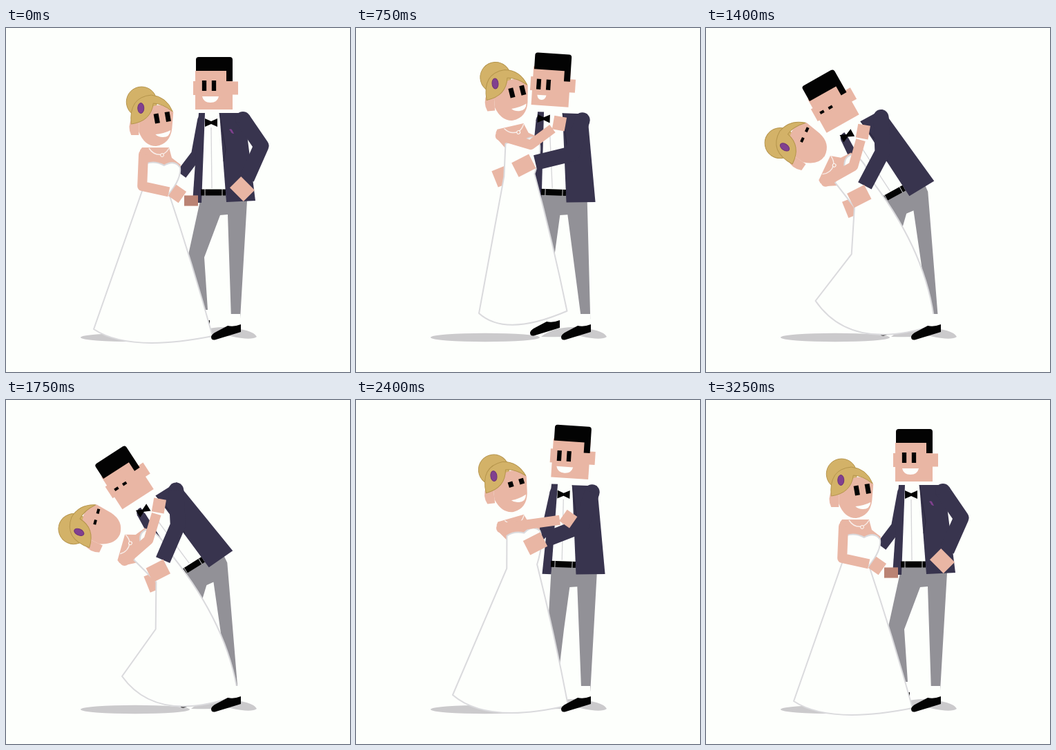
An HTML page with a canvas for the animation above (3.3 s loop, 498 by 498 pixels).

```html
<!DOCTYPE html>
<html lang="en">
<head>
<meta charset="utf-8">
<title>Wedding dance</title>
<style>
html, body { margin: 0; width: 100%; height: 100%; overflow: hidden; background: #fdfffc; }
canvas { display: block; }
</style>
</head>
<body>
<canvas id="stage" width="498" height="498"></canvas>
<script>
const c = document.getElementById('stage').getContext('2d');
const LOOP = 3300, STEP = 50;
const WHITE = '#fdfffc', BLACK = '#030303', SKIN = '#e9b6a4', NAVY = '#38344e',
  GREY = '#929197', SHADOW = '#cbcacc', HAIR = '#d3b268', HAIRLINE = '#b5954c',
  PURPLE = '#81408f', TRIM = '#dadadd';

// His hip and lean, her neck and bend, and the trailing hem corner; the rest follows by rule
const rest = { hip: 301, lean: 0, neckX: 226, neckY: 183, bend: 0, hemX: 127, hemY: 436 };
const hold = { hip: 301, lean: 2, neckX: 236, neckY: 178, bend: -16, hemX: 140, hemY: 427 };
const hop = { hip: 287, lean: 2, neckX: 235, neckY: 150, bend: -13, hemX: 178, hemY: 413 };
const kiss = { hip: 274, lean: -21.5, neckX: 197, neckY: 182, bend: -47, hemX: 149, hemY: 390 };
const dip = { hip: 271, lean: -32, neckX: 179, neckY: 207, bend: -74, hemX: 168, hemY: 400 };
const rise = { hip: 268, lean: -20, neckX: 187, neckY: 194, bend: -59, hemX: 155, hemY: 427 };
const timeline = [[0, rest], [500, hold], [750, hop], [1150, kiss], [1650, dip], [1750, dip],
  [2050, rise], [2400, hold], [2980, rest], [LOOP, rest]];

// Monotone cubic through the key poses
function tween(key, t) {
  const time = i => timeline[i][0], val = i => timeline[i][1][key];
  const slope = i => (val(i + 1) - val(i)) / (time(i + 1) - time(i));
  const tangent = i => {
    if (i < 1 || i > timeline.length - 2) return 0;
    const a = slope(i - 1), b = slope(i);
    return a * b > 0 ? 2 * a * b / (a + b) : 0;
  };
  let i = 0;
  while (i < timeline.length - 2 && t >= time(i + 1)) i++;
  const h = time(i + 1) - time(i), u = (t - time(i)) / h, v = 1 - u;
  return v * v * (1 + 2 * u) * val(i) + u * u * (1 + 2 * v) * val(i + 1) +
    h * u * v * (v * tangent(i) - u * tangent(i + 1));
}

function ramp(t, from, to) {
  const u = Math.min(1, Math.max(0, (t - from) / (to - from)));
  return u * u * (3 - 2 * u);
}

const pulse = (t, a, b, d, e) => ramp(t, a, b) - ramp(t, d, e);
const mix = (p, q, k) => p.map((v, i) => v + (q[i] - v) * k);
const add = ([x, y], dx, dy) => [x + dx, y + dy];

function turn(origin, deg, x, y) {
  const a = deg * Math.PI / 180, co = Math.cos(a), si = Math.sin(a);
  return add(origin, x * co - y * si, x * si + y * co);
}

// Elbow of a two-bone arm; side picks the way it bends
function elbow([x, y], [hx, hy], upper, lower, side) {
  const dx = hx - x, dy = hy - y, d = Math.hypot(dx, dy);
  const along = (upper * upper - lower * lower + d * d) / (2 * d);
  const out = side * Math.sqrt(Math.max(0, upper * upper - along * along));
  return [x + (dx * along - dy * out) / d, y + (dy * along + dx * out) / d];
}

function at([x, y], deg, draw) {
  c.save();
  c.translate(x, y);
  c.rotate(deg * Math.PI / 180);
  draw();
  c.restore();
}

function poly(color, ...p) {
  c.beginPath();
  for (let i = 0; i < p.length; i += 2) c.lineTo(p[i], p[i + 1]);
  c.fillStyle = color;
  c.fill();
}

function shape(d, fill, line, width = 1) {
  const path = new Path2D(d);
  c.fillStyle = fill;
  if (fill) c.fill(path);
  c.strokeStyle = line;
  c.lineWidth = width;
  if (line) c.stroke(path);
}

function oval(x, y, rx, ry, fill, line) {
  c.beginPath();
  c.ellipse(x, y, rx, ry, 0, 0, 7);
  c.fillStyle = fill;
  c.fill();
  c.strokeStyle = line;
  c.lineWidth = 1;
  if (line) c.stroke();
}

function box(x, y, w, h, color) {
  c.fillStyle = color;
  c.fillRect(x - w / 2, y - h / 2, w, h);
}

function limb(color, width, ...joints) {
  oval(...joints[0], width / 2, width / 2, color);
  c.beginPath();
  for (const p of joints) c.lineTo(...p);
  c.strokeStyle = color;
  c.lineWidth = width;
  c.stroke();
}

function arm(color, width, shoulder, hand, upper, lower, side, deg, w, h) {
  const joint = elbow(shoulder, hand, upper, lower, side);
  limb(color, width, shoulder, joint, mix(joint, hand, .76));
  at(hand, deg, () => box(0, 0, w, h, SKIN));
}

function shoe(dx, dy) {
  at([dx, dy], 0, () => {
    poly(WHITE, 324, 414, 339, 414, 340, 432, 324, 434);
    shape('M297,447 Q298,443 304,440 L321,431 Q330,433 340,429 V440 L304,451 Q297,453 297,447 Z', BLACK);
  });
}

function legs(hip, lean, held) {
  const p = (x, y) => turn(hip, lean * .6, x, y);
  const knee = hip[0] - 25 + 14 * held, ankle = [339 + lean * .12, 421 + lean * .2];
  poly(GREY, ...p(-18, 3), ...p(20, 0), ...p(9, 33), knee + 11, 332, 292, 408, 279, 408, knee - 12, 328);
  poly(GREY, ...p(-18, 3), ...p(46, -6), ...p(48, 12), ...ankle, ...add(ankle, -13, 1), ...p(20, 32), ...p(8, 33));
}

function torso(hip, lean, hug) {
  limb(NAVY, 16, ...[[-16 - 6 * hug, -104], [-25, -55], [-47, -26]].map(p => turn(hip, lean, ...p)));
  at(hip, lean, () => {
    const b = -4 - 15 * hug, by = -101 - 5 * hug, side = -6 * hug, top = -115 - lean * .4;
    poly(WHITE, side - 14, -119, 9, -119, 20, 2, -19, 2);
    poly(NAVY, side - 22, top, side - 13, top, -18, 15, -31, 15);
    shape(`M${side - 4},-94 L-3,-6`, null, '#d5d5d8', 1.3);
    box(-1, 0, 36, 9, BLACK);
    shape('M-13,-5V5 M12,-5V5', null, '#c8c8ca');
    poly(BLACK, b - 9, by - 6, b, by - 2, b + 9, by - 6, b + 9, by + 6, b, by + 2, b - 9, by + 6);
    poly(NAVY, 8, -115, 44, -115, 60, 12, 18, 14);
    shape('M8,-115 L17,-62 L14,-45', null, '#29253c');
    shape('M22,-91 q4,-2 5,2 l2,4 q-4,0 -5,-4 z', PURPLE);
  });
}

function manHead(hip, lean, held, hug, shut) {
  const tilt = lean * 1.08 + 1.6 * held, fx = -3 * held - hug, fy = 3 * held + hug;
  const smile = (1 - .45 * hug) * (1 - shut);
  at(turn(hip, tilt - 5.5 * hug, 0, -148 - 5 * held), tilt, () => {
    box(0, 0, 54, 56, SKIN);
    box(-27.5, -3, 5, 20, SKIN);
    box(30.5, -3, 9, 19, SKIN);
    shape(`M-26,${fy - 28} V-44 Q-26,-48 -22,-48 H23 Q27,-48 27,-44 V${fy - 13} H18 V${fy - 28} Z`, BLACK);
    for (const x of [-14, 0]) box(x + fx, fy - 6.5 + shut, 6.3, 15 - 11 * shut, BLACK);
    at([fx - 5 - 8 * (1 - smile), fy + 9], 0, () => {
      c.scale(smile, Math.min(1, smile * 1.4));
      shape('M-12,0 H12 Q10,9 0,9 Q-10,9 -12,0 Z', WHITE);
    });
  });
}

function brideHead(neck, bend, held, smile, shut) {
  const tilt = bend + 9 * held;
  at(turn(neck, .78 * tilt - 17 + 3 * held, 0, -47 - 4 * held), tilt, () => {
    oval(-16, -31, 22, 22, HAIR, HAIRLINE);
    shape('M-20,-8 H-30 Q-37,5 -31,17 L-20,17 Z', SKIN);
    shape('M-20,-10 V12 Q-12,33 5,33 Q25,30 28,8 L30,-16 Q10,-40 -20,-10 Z', SKIN);
    shape('M-31,1 Q-35,-38 -2,-41 Q20,-39 29,-17 Q14,-29 1,-29 Q-2,-3 -31,1 Z', HAIR, HAIRLINE);
    oval(-17, -22, 4.5, 7.5, PURPLE, '#6c3279');
    for (const x of [6, 22])
      at([x, -6 - x / 6], -10, () => box(0, 0, 7, 14 - 10 * shut, BLACK));
    at([15, 15], 0, () => {
      c.scale(smile, smile);
      shape('M-11,1 Q1,0 11,-5 Q10,5 0,5 Q-7,5 -11,1 Z', WHITE);
    });
  });
}

function dress(neck, bend, waist, waistR, hem, lift, kissing) {
  at(neck, bend, () => {
    poly(SKIN, -29, -10, 10, -10, 14, 5, 27, 15, 24, 26, -20, 26, -32, 4, -32, -6);
    shape('M-19,-9 Q-12,2 0,0 Q6,-2 10,-9', null, '#f8eeea', 1.4);
  });
  const p = (x, y) => turn(neck, bend, x, y);
  const corner = [299 - bend / 2, 446 + bend / 4 - 33 * lift];
  const curve = (ctrl, end) => c.quadraticCurveTo(...ctrl, ...end);
  c.beginPath();
  c.moveTo(...p(-22, 13));
  curve(p(-10, 9), p(3, 16));
  curve(p(18, 7), p(26, 19));
  curve(p(28, 35), waistR);
  curve(add(mix(waistR, corner, .5), 3 + 30 * kissing, 0), corner);
  curve([mix(hem, corner, .3)[0], 470 - 22 * lift], hem);
  c.lineTo(...add(mix(waist, hem, .5), 24 * kissing, 0));
  c.lineTo(...waist);
  c.closePath();
  c.fillStyle = WHITE;
  c.fill();
  c.strokeStyle = TRIM;
  c.lineWidth = 2;
  c.stroke();
  at(neck, bend, () => oval(0, 1, 2.4, 2.4, SKIN, WHITE));
}

function render(t) {
  const s = {};
  for (const key in rest) s[key] = tween(key, t);
  const { lean, bend } = s;
  const held = pulse(t, 0, 500, 2400, 2980), hug = pulse(t, 500, 750, 2050, 2400),
    lift = pulse(t, 500, 750, 750, 1150), kissing = pulse(t, 750, 1150, 1750, 2050),
    blink = pulse(t, 2300, 2400, 2400, 2500) * .6, reach = lift + kissing;

  const hip = [s.hip, 238 - lean * .06], neck = [s.neckX, s.neckY], grow = 1 + .13 * held;
  const waist = turn(neck, bend * .85, -29 * grow, 53 * grow);
  const waistR = turn(neck, bend * .85, 10 * grow, 57 * grow);
  const farHand = mix(add(hip, -33 - 28 * held, 12), add(waist, -4, 0), hug);
  const nearHand = mix(add(hip, 41, -5),
    add(waist, 34 + .42 * bend + 14 * (1 - hug), -16 - 20 * (1 - hug)), held);
  const herHand = mix(add(neck, 22, 57), turn(hip, lean, 4, -66 - 34 * reach), held);

  c.fillStyle = WHITE;
  c.fillRect(0, 0, 498, 498);
  c.lineJoin = 'round';
  oval(187, 448, 79, 6.3, SHADOW);
  shape('M268,447 Q285,433 315,433 Q358,436 363,447 Q355,453 325,446 Q295,448 268,447 Z', SHADOW);

  shoe(-45, -6);
  legs(hip, lean, held);
  torso(hip, lean, hug);
  manHead(hip, lean, held, hug, kissing);
  at(farHand, -22 * hug, () => {
    box(0, 0, 20, 15 + 10 * hug, SKIN);
    box(0, 0, 20, 15 + 10 * hug, `rgba(120,60,50,${.42 * (1 - held)})`);
  });
  dress(neck, bend, waist, waistR, [s.hemX, s.hemY], lift, kissing);
  arm(NAVY, 22, turn(hip, lean, 42 - 5 * held, -106), nearHand,
    47 + 4 * held, 68 + 4 * held, -1, 45 - 72 * held, 28, 23);
  arm(SKIN, 14, turn(neck, bend, -27, 0), herHand, 46, 52, 1, 35 - 25 * reach, 18, 20);
  brideHead(neck, bend, held, 1 - kissing, Math.max(kissing, blink));
  shoe(0, 0);
}

function frame() {
  const t = performance.now() % LOOP;
  render(Math.floor(t / STEP) * STEP);
  requestAnimationFrame(frame);
}
frame();
</script>
</body>
</html>
```
